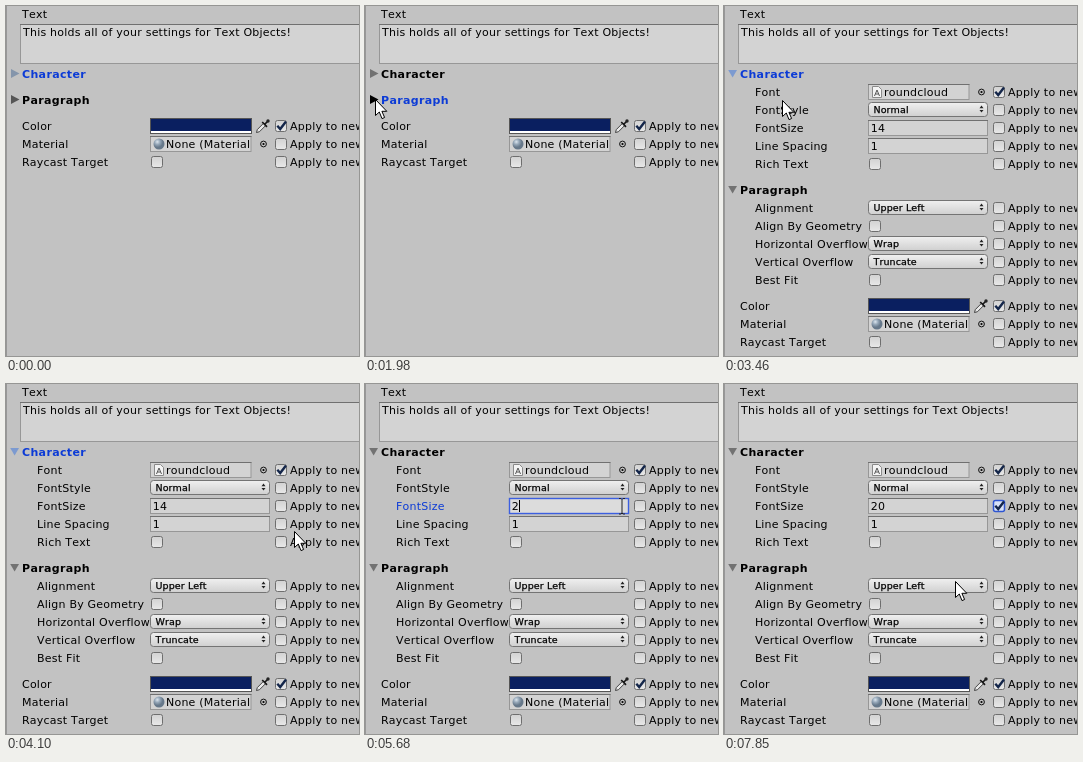
Animation of 353 by 350 pixels, one loop 8000 ms. Source, as an HTML page:

```html
<!DOCTYPE html>
<html lang="en">
<head>
<meta charset="utf-8">
<title>Text settings inspector</title>
<style>
html, body { margin: 0; width: 100%; height: 100%; overflow: hidden; background: #c2c2c2; }
svg { display: block; }
text { font: 11px "DejaVu Sans", sans-serif; letter-spacing: .22px; font-kerning: none; white-space: pre; }
.head { font-weight: bold; letter-spacing: .35px; }
.small { font-size: 9.5px; letter-spacing: .1px; stroke: #000; stroke-width: .25px; }
.field { fill: #d3d3d3; stroke: #979797; }
.popup { fill: url(#popup); stroke: #747474; }
.box { fill: url(#box); stroke: #6e6e6e; }
.tick { fill: none; stroke: #14264a; stroke-width: 2.4; }
</style>
</head>
<body>
<svg id="stage" width="353" height="350" viewBox="0 0 353 350">
  <defs>
    <linearGradient id="popup" x2="0" y2="1"><stop stop-color="#f0f0f0"/><stop offset="1" stop-color="#d0d0d0"/></linearGradient>
    <linearGradient id="box" x2="0" y2="1"><stop stop-color="#d2d2d2"/><stop offset="1" stop-color="#e8e8e8"/></linearGradient>
    <radialGradient id="ball" cx=".35" cy=".3"><stop stop-color="#dbe5ee"/><stop offset=".5" stop-color="#95a7b8"/><stop offset="1" stop-color="#66788a"/></radialGradient>
  </defs>
  <rect width="353" height="350" fill="#c2c2c2"/>
  <rect width="1" height="350" fill="#989898"/>
  <g id="panel"></g>
  <g id="arrow"><path d="M.5 .5V16.5L4.3 13L7 19.6L9.6 18.5L6.9 12.3H11.8Z" fill="#fff" stroke="#000"/></g>
  <g id="beam"><path d="M-3 -7.5H-1L0 -6.5L1 -7.5H3M0 -6.5V7M-3 8H-1L0 7L1 8H3" fill="none" stroke="#222"/></g>
  <g id="resize"><path d="M-11.5 0L-7 -4.5V-1.5H7V-4.5L11.5 0L7 4.5V1.5H-7V4.5Z" fill="#fff" stroke="#000"/></g>
</svg>
<script>
const LOOP = 8000;
const BLUE = '#0c3bd6', BLACK = '#000', GRAY = '#565656', SOFT = '#727272', TINT = '#8495ab';
const $ = id => document.getElementById(id);

// Drawing helpers; y is the middle of a row
const text = (x, y, s, cls = '', id = '') => `<text x="${x}" y="${y + 4}" class="${cls}" id="${id}">${s}</text>`;
const rect = (x, y, w, h, cls, r = 0) =>
  `<rect x="${x + .5}" y="${y + .5}" width="${w}" height="${h}" rx="${r}" class="${cls}"/>`;
const group = (id, ...parts) => `<g id="${id}">${parts.join('')}</g>`;
const tick = y => `<path class="tick" d="M271.3 ${y - .3}L274.2 ${y + 3}L280 ${y - 4.5}"/>`;
const check = (x, y) => rect(x, y - 6, 11, 11, 'box', 2);
const apply = (y, on) => check(269, y) + (on ? tick(y) : '') + text(284, y, 'Apply to new');
const toggle = y => check(145, y);
const field = (y, w) => rect(144, y - 8, w, 15, 'field') +
  `<path d="M144 ${y - 7.5}h${w + 1}" stroke="#707070"/>`;
const picker = y => `<circle cx="257.5" cy="${y}" r="2.9" fill="none" stroke="#111"/><circle cx="257.5" cy="${y}" r="1.1"/>`;
const popup = (y, s) => rect(144, y - 8, 119, 14, 'popup', 3) + text(149.5, y - .6, s, 'small') +
  `<path d="M255.5 ${y - 1.8}h4l-2 -2.6zM255.5 ${y}h4l-2 2.6z" fill="#222"/>`;
const row = (x, y, label, control, on = false, id = '') => text(x, y, label, '', id) + control + apply(y, on);

const foldout = (id, y, label) =>
  group(id + 'Closed', `<path d="M5 ${y - 5}L13.5 ${y - .5}L5 ${y + 4}Z"/>`) +
  group(id + 'Open', `<path d="M4.2 ${y - 4}H13L8.6 ${y + 3.6}Z"/>`) +
  text(16, y, label, 'head', id + 'Label');

const swatch = y => `<rect x="144.5" y="${y - 7.5}" width="101" height="15" fill="#fff" stroke="#555"/>
  <rect x="145" y="${y - 7}" width="100" height="12" fill="#0a1f60"/>
  <path d="M250.5 ${y + 6.5}L251.3 ${y + 3.6}L257.6 ${y - 2.8}L259.8 ${y - .6}L253.5 ${y + 5.7}Z" fill="#e8e8e8" stroke="#333" stroke-width=".9"/>
  <path d="M256.2 ${y - 4}L261 ${y + .8}M259 ${y - 2}L262 ${y - 5}" fill="none" stroke="#161616" stroke-width="1.7"/>
  <circle cx="262" cy="${y - 5}" r="1.7" fill="#222"/>`;

const fontField = y => field(y, 100.5) +
  `<path d="M148.5 ${y - 5.5}h6l3 3v8h-9z" fill="#f4f4f4" stroke="#8a8a8a"/>
   <path d="M150.5 ${y + 4}L153 ${y - 2}L155.5 ${y + 4}M151.5 ${y + 2}h3" fill="none" stroke="#555"/>` +
  text(160, y, 'roundcloud') + picker(y);

const materialField = y => field(y, 100.5) +
  `<circle cx="153" cy="${y}" r="5.5" fill="url(#ball)"/>` + text(160, y, 'None (Material') + picker(y);

const sizeField = y => field(y, 119) +
  group('focus', `<rect x="144.5" y="${y - 7.5}" width="119" height="15" fill="#dcdcdc" stroke="#3c5fe0" stroke-width="1.4"/>`) +
  group('select', `<rect x="146.5" y="${y - 6}" width="15.5" height="13" fill="#8aa6e0"/>`) +
  ['14', '2', '20'].map(s => text(146.8, y, s, '', 'size' + s)).join('') +
  group('caret', `<path d="M154.5 ${y - 6}v12" stroke="#000"/>`);

$('panel').innerHTML =
  text(16, 8, 'Text') + rect(14, 18, 345, 39, 'field') + '<path d="M14 18.5h339" stroke="#707070"/>' +
  text(17, 26, 'This holds all of your settings for Text Objects!') +
  foldout('char', 68, 'Character') +
  group('charRows',
    row(31, 86, 'Font', fontField(86), true),
    row(31, 104, 'FontStyle', popup(104, 'Normal')),
    row(31, 122, 'FontSize', sizeField(122), false, 'sizeLabel'),
    group('sizeCheck', '<rect x="269.5" y="116.5" width="11" height="11" rx="2" fill="#d9e2f7" stroke="#2f56d2" stroke-width="1.5"/>'),
    group('sizeTick', tick(122)),
    row(31, 140, 'Line Spacing', field(140, 119) + text(146.8, 140, '1')),
    row(31, 158, 'Rich Text', toggle(158))) +
  group('paragraph',
    foldout('para', 94, 'Paragraph'),
    group('paraRows',
      row(31, 112, 'Alignment', popup(112, 'Upper Left')),
      row(31, 130, 'Align By Geometry', toggle(130)),
      row(31, 148, 'Horizontal Overflow', popup(148, 'Wrap')),
      row(31, 166, 'Vertical Overflow', popup(166, 'Truncate')),
      row(31, 184, 'Best Fit', toggle(184)))) +
  group('footer',
    row(16, 120, 'Color', swatch(120), true),
    row(16, 138, 'Material', materialField(138)),
    row(16, 156, 'Raycast Target', toggle(156)));

// Stepped tracks: [time, value] pairs, each held until the next
function track(id, prop, steps) {
  const frames = steps.map(([t, v]) => ({ offset: t / LOOP, [prop]: v, easing: 'steps(1, end)' }));
  frames.push({ offset: 1, [prop]: steps.at(-1)[1] });
  $(id).animate(frames, { duration: LOOP, iterations: Infinity });
}
const show = (id, from, to = LOOP) => track(id, 'opacity', [
  ...(from > 0 ? [[0, 0]] : []), [from, 1], ...(to < LOOP ? [[to, 0]] : [])]);
const at = (x, y) => `translate(${x}px, ${y}px)`;
const shift = (id, ...steps) => track(id, 'transform', [[0, at(0, 0)], ...steps.map(([t, y]) => [t, at(0, y)])]);

const PARA_OPEN = 2010, CHAR_OPEN = 3080, FOCUS = 4740, BLUR = 7100;

shift('paragraph', [CHAR_OPEN, 90]);
shift('footer', [PARA_OPEN, 90], [CHAR_OPEN, 180]);
show('charRows', CHAR_OPEN);
show('charOpen', CHAR_OPEN);
show('charClosed', 0, CHAR_OPEN);
show('paraRows', PARA_OPEN);
show('paraOpen', PARA_OPEN);
show('paraClosed', 0, PARA_OPEN);

track('charLabel', 'fill', [[0, BLUE], [1980, BLACK], [2980, BLUE], [FOCUS, BLACK]]);
track('charClosed', 'fill', [[0, TINT], [1980, SOFT], [2980, BLACK]]);
track('charOpen', 'fill', [[0, '#7c9ad0'], [FOCUS, SOFT]]);
track('paraLabel', 'fill', [[0, BLACK], [1980, BLUE], [2980, BLACK]]);
track('paraClosed', 'fill', [[0, GRAY], [1980, BLACK]]);
track('paraOpen', 'fill', [[0, TINT], [2980, SOFT]]);

track('sizeLabel', 'fill', [[0, BLACK], [FOCUS, BLUE], [BLUR, BLACK]]);
show('focus', FOCUS, BLUR);
show('select', 4840, 5680);
show('size14', 0, 5680);
show('size2', 5680, 5710);
show('size20', 5710);
track('caret', 'opacity', [[0, 0], [FOCUS, 1], [4840, 0], [5680, 1], [BLUR, 0]]);
track('caret', 'transform', [[0, at(7, 0)], [5680, at(0, 0)], [5710, at(7, 0)]]);
show('sizeCheck', BLUR);
show('sizeTick', 7180);

// Samples a path of [time, x, y] points at n even steps
function move(n, pts) {
  const start = pts[0][0], span = pts.at(-1)[0] - start;
  return Array.from({ length: n }, (_, i) => {
    const t = start + span * i / (n - 1);
    const k = Math.max(1, pts.findIndex(p => p[0] >= t - .01));
    const [a, b] = [pts[k - 1], pts[k]];
    const u = (t - a[0]) / (b[0] - a[0]);
    const mix = j => Math.round(a[j] + (b[j] - a[j]) * u);
    return [Math.round(t), mix(1), mix(2)];
  });
}

const path = [
  [0, 200, 400],
  ...move(18, [[120, 177, 336], [300, 140, 270], [480, 62, 176], [677, 22, 134], [910, 18, 100]]),
  [960, 9, 94], [990, 3, 95, 'resize'], [1190, 4, 94, 'resize'], [1290, 3, 94, 'resize'],
  [1470, 8, 92], [1500, 10, 93],
  ...move(11, [[2210, 10, 91], [2480, 9, 76], [2720, 6, 64]]),
  ...move(13, [[3360, 14, 69], [3600, 128, 132], [3780, 262, 175], [3920, 288, 154]]),
  ...move(11, [[4100, 288, 147], [4330, 274, 132], [4560, 257, 122]]),
  ...move(4, [[6500, 258, 121], [6650, 267, 116]]),
  ...move(3, [[6880, 270, 116], [7000, 275, 118]]),
  ...move(9, [[7240, 272, 122], [7440, 248, 160], [7650, 233, 191]]),
  [7700, 232, 196], [7850, 231, 197],
];

const kindOf = ([t, x, , kind]) => kind || (t > 4100 && t < 6700 && x < 265 ? 'beam' : 'arrow');
for (const kind of ['arrow', 'beam', 'resize'])
  track(kind, 'transform', path.map(p => [p[0], kindOf(p) === kind ? at(p[1], p[2]) : at(-99, -99)]));
</script>
</body>
</html>
```
